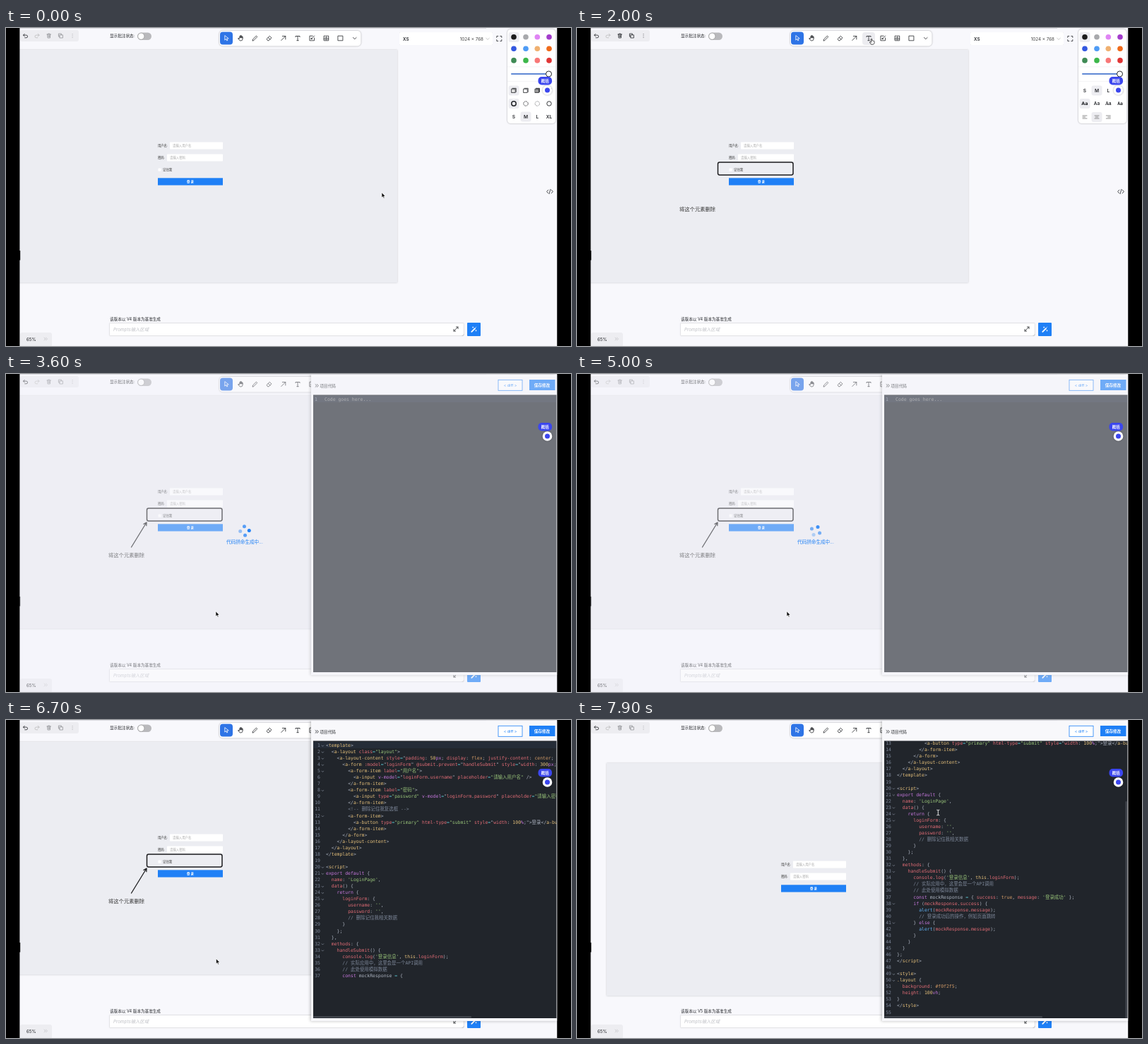
Animation of 800x450 px, one loop 8000 ms. Source, as an HTML page:

```html
<!DOCTYPE html>
<html lang="zh-CN">
<head>
<meta charset="utf-8">
<style>
html, body { margin: 0; width: 100%; height: 100%; overflow: hidden; background: #000; }
svg { display: block; width: 100vw; height: 100vh; }
text { font-family: Inter, "Noto Sans CJK SC", "Noto Sans CJK", sans-serif; white-space: pre; }
.code text { font: 6.46px "DejaVu Sans Mono", "Noto Sans CJK SC", "Noto Sans CJK", monospace; }
.icon { fill: none; stroke-width: .8; stroke-linecap: round; stroke-linejoin: round; }
.card { filter: drop-shadow(0 .7px 1.2px #0005); }
</style>
</head>
<body>
<svg id="stage" viewBox="0 0 800 450"></svg>
<script>
const stage = document.getElementById('stage');
const $ = id => document.getElementById(id);
const INK = '#25272b', BLUE = '#1f80f6', SOFT = '#ededf1';

const rect = (x, y, w, h, fill, more = '') =>
  `<rect x="${x}" y="${y}" width="${w}" height="${h}" fill="${fill}" ${more}/>`;
const dot = (x, y, r, fill, more = '') => `<circle cx="${x}" cy="${y}" r="${r}" fill="${fill}" ${more}/>`;
const label = (x, y, size, s, fill = INK, more = '') =>
  `<text x="${x}" y="${y + size * .36}" font-size="${size}" fill="${fill}" ${more}>${s}</text>`;
const icon = (d, x, y, color = INK, more = '') =>
  `<path class="icon" d="${d}" transform="translate(${x} ${y})" stroke="${color}" ${more}/>`;
const MID = 'text-anchor="middle"', BOLD = 'font-weight="600"';

const CHEVRON = 'M-2.3-1L0 1.2L2.3-1';
const TOOLS = [
  'M-2.2-3.5V2.6L-.5 1L.8 3.5L1.8 3L.7.6L2.8.4Z',
  'M-3.2.4l.9-.8l1 1v-3.6q.5-.8 1 0v2.5v-3.2q.6-.7 1.1 0v3.2v-2.6q.6-.6 1.1 0v3v-1.9q.6-.6 1.1 0v2.6q-.2 3-3 3q-1.7 0-3.2-3.2z',
  'M-3.3 3.3l.5-2L2-3.4L3.4-2L-1.4 2.8z',
  'M-3.3.8L.7-3.2L3.3-.6L-.5 3.3h-1.2zM-1.4-1.1L1.2 1.5',
  'M-3 3L3-3M-1.5-3H3V1.5',
  'M-3-1.8V-3H3V-1.8M0-3V3.2M-1.2 3.2H1.2',
  'M1-3.3H-3.3V3.3H3.3V-.5M-1 1L3.4-3.4M-1 1V-.4M-1 1H.4',
  'M-1.2-3.3H-3.3V3.3H3.3V-3.3H1.2M0-3.5V.6M-1.5-.9L0 .6L1.5-.9M-3.3.8h1.6l.6 1h2.2l.6-1H3.3',
  'M-3.3-3.3H3.3V3.3H-3.3Z', CHEVRON];
const toolX = i => 312 + i * 20.2;

// ---------- page ----------
function form() {
  const field = (y, name, x, hint) => label(215, y, 4.3, name, '#333') +
    rect(x, y - 5, 307 - x, 10, '#fff', 'rx=".7"') + label(x + 4, y, 4.4, hint, '#aaa');
  return `<g id="form">${field(166.5, '用户名:', 232, '请输入用户名')}${field(183.5, '密码:', 228, '请输入密码')}
    <g id="remember">${rect(215.5, 198.5, 4, 4, '#fff', 'rx=".5"')}${label(222, 200.5, 4.4, '记住我', '#333')}</g>
    <g id="login">${rect(215, 212.3, 92, 10.2, BLUE)}${label(261, 217.3, 4.4, '登 录', '#fff', MID + BOLD)}</g></g>`;
}

function marks() {
  return `<g id="marks" fill="none" stroke="#1d1d1f" stroke-width="1.5" stroke-linecap="round" stroke-linejoin="round">
    <rect id="box" x="199.5" y="190" rx="2.4"/><path id="arrow" stroke-width="1.3"/>
    <text id="note" x="145" y="258.5" font-size="7.3" fill="#333" stroke="none"></text></g>`;
}

function topBar() {
  const undo = 'M-3-.9H1.2A1.8 1.8 0 0 1 1.2 2.8H-.8M-1.2-2.7L-3-.9L-1.2.9';
  const edit = ['M-2.8-2H2.8M-2-2L-1.7 3H1.7L2-2M-1-2V-3H1V-2M-.6-.5V1.6M.6-.5V1.6',
    'M-1.2-1.2H3V3H-1.2ZM-1.2 1H-3V-3H1V-1.2', 'M0-2.3v.01M0 0v.01M0 2.3v.01'];
  return rect(20, 3, 83, 16, SOFT, 'rx="3"') + icon(undo, 27.5, 11) +
    `<g transform="matrix(-1 0 0 1 44 11)">${icon(undo, 0, 0, '#bbb')}</g>` +
    `<g id="edit">${edit.map((d, i) => icon(d, 60.7 + i * 16.7, 11)).join('')}</g>` +
    label(147, 11.3, 5.6, '显示批注状态:') +
    rect(186, 6.5, 20, 10.4, '#b9b9bc', 'rx="5.2"') + dot(191.3, 11.7, 4.6, '#fff', 'stroke="#888" stroke-width=".6"') +
    `<g class="card">${rect(302, 4, 200.5, 21.5, '#fff', 'rx="5"')}</g>` +
    rect(404, 6, 18, 18, '#ececf0', 'rx="4" id="hover"') +
    rect(303, 5.5, 18, 18, '#2e74e6', 'rx="4" id="active"') +
    TOOLS.map((d, i) => icon(d, toolX(i), 14.5, INK, `id="tool${i}"`)).join('') +
    `<g class="card" style="filter:drop-shadow(0 .4px .5px #0003)">${rect(557, 6, 132, 18, '#fff', 'rx="1.5"')}</g>` +
    label(562, 15.3, 6.3, 'XS', INK, BOLD) + label(676, 15.3, 6.3, '1024 × 768', '#444', 'text-anchor="end"') +
    icon(CHEVRON, 682, 15.3, '#bbb') +
    icon('M-3.5-1.5V-3.5H-1.5M1.5-3.5H3.5V-1.5M3.5 1.5V3.5H1.5M-1.5 3.5H-3.5V1.5', 698.3, 15);
}

function stylePanel() {
  const X = [719, 736, 752.3, 769];
  const colors = ['#1d1d1d', '#a8a9ac', '#e085f4', '#a33ccb', '#3458e0', '#4f9cf5', '#f0b070', '#f06a1a',
    '#3f8a55', '#3cb74a', '#f87777', '#e03535'];
  const hot = (x, y) => rect(x - 7.5, y - 7, 15, 14, SOFT, 'rx="3"');
  const sizes = y => hot(X[1], y) + ['S', 'M', 'L', 'XL'].map((s, i) => label(X[i], y, 6.6, s, INK, MID + BOLD)).join('');
  const cube = 'M-3-2.2H2.2V3H-3ZM-2-3.2H3.2V2';
  const fonts = ['"DejaVu Sans"', 'Inter', '"Noto Serif"', '"DejaVu Sans Mono"'];
  const aligns = [[-3, 3, 0], [-3, 3, -1.8], [-3, 3, 0]];
  return `<g class="card">${rect(710, 2, 68, 133, '#fff', 'rx="4.5"')}</g>` + hot(X[0], 13) +
    colors.map((c, i) => dot(X[i % 4], 12.7 + (i >> 2) * 16.6, 3.8, c)).join('') +
    rect(710, 54.7, 68, .5, '#e8e8ec') + rect(710, 75, 68, .5, '#e8e8ec') +
    rect(715, 64.2, 53, 1.6, '#2c63c8', 'rx=".8"') + dot(768.5, 65, 4, '#fff', `stroke="${INK}"`) +
    `<g id="shapeStyles">${hot(X[0], 88.5)}${hot(X[0], 107)}
      ${X.map((x, i) => icon(cube, x, 88.5, INK, i == 2 ? 'style="fill:#999"' : i == 0 ? 'style="fill:#ddd"' : '')).join('')}
      ${X.map((x, i) => dot(x, 107, 3.2, 'none', `stroke="${INK}" stroke-width="${[1.5, .9, .6, .9][i]}" ${i == 1 ? 'stroke-dasharray="1.6 .9"' : i == 2 ? 'stroke-dasharray=".7 .6"' : ''}`)).join('')}
      ${sizes(125.5)}</g>` +
    `<g id="textStyles">${sizes(88.5)}${hot(X[0], 107)}${hot(X[1], 126)}
      ${X.map((x, i) => label(x, 107, 6.4, 'Aa', INK, MID + BOLD + ` style='font-family:${fonts[i]},sans-serif'`)).join('')}
      ${aligns.map(([a, b], i) => icon(`M${a}-2H${b}M${[-3, -1.8, -.6][i]} 0h3.6M${a} 2H${b}`, X[i], 126, '#777')).join('')}</g>` +
    icon('M-2.2-2.4L-4.4 0L-2.2 2.4M2.2-2.4L4.4 0L2.2 2.4M.9-3.2L-.9 3.2', 770, 231.5);
}

function promptBar() {
  return label(147, 411.5, 5.6, '该版本以 V4 版本为基准生成', INK, 'id="version"') +
    rect(146.4, 417.4, 502, 18.2, '#fff', 'stroke="#d4d5da" stroke-width=".7" rx="1"') +
    label(152, 426.3, 6.3, 'Prompts输入区域', '#bfc0c6', 'font-style="italic"') +
    icon('M-3 3L3-3M.4-3H3V-.4M-3 .4V3H-.4', 637, 426) +
    icon('M-1 1L1-1M0 1L1 0', 647, 434.5, '#999', 'style="stroke-width:.4"') +
    rect(653, 417, 19, 19, BLUE, 'rx="1"') +
    icon('M-3.2 3.4L1.6-1.4', 662.5, 426.5, '#fff', 'style="stroke-width:1.8"') +
    icon('M-1.3-3.6v1.4M-2-2.9h1.4M3 1v1.4M2.3 1.7h1.4M3.2-3.4L2.6-2.8', 662.5, 426.5, '#fff', 'style="stroke-width:.7"') +
    rect(20, 431, 45, 20, SOFT, 'rx="3"') + label(29, 440.3, 6.2, '65%') +
    icon('M-2-1.8L0 0L-2 1.8M.5-1.8L2.5 0L.5 1.8', 56, 440, '#c4c4c8');
}

function drawer() {
  return `<g id="drawer"><g style="filter:drop-shadow(-1px 0 2px #0004)">${rect(432, 1, 348.5, 425, '#f8f8fb')}</g>
    ${icon('M-2-1.9L0 0L-2 1.9M.4-1.9L2.4 0L.4 1.9', 440, 16.5)}${label(444.5, 16.7, 5.6, '项目代码')}
    ${rect(697, 8.3, 34, 15, '#fff', `stroke="${BLUE}" stroke-width=".8"`)}${label(714, 15.8, 5.4, '&lt; diff &gt;', BLUE, MID)}
    ${rect(741, 8, 36.5, 15, BLUE)}${label(759, 15.6, 5.6, '保存修改', '#fff', MID + BOLD)}
    ${rect(435, 29.5, 344.5, 392.5, '#21252b')}
    <g class="code" clip-path="url(#editor)">
      <g id="scrollY">${rect(435, 31, 344.5, 9, '#69f', 'opacity=".06"')}<g id="gutter"></g></g>
      <text id="hint" x="451" y="37.9" fill="#888">Code goes here...</text>
      <g clip-path="url(#textArea)"><g id="lines"></g></g>
    </g>
    ${rect(435, 419, 224, 2.6, '#41454c', 'id="barX" rx="1.3"')}${rect(776.5, 30, 2.3, 307, '#41454c', 'id="barY" rx="1.1"')}</g>`;
}

stage.innerHTML = `<defs><clipPath id="editor">${rect(435, 29.5, 344.5, 392.5, '#000')}</clipPath>
  <clipPath id="textArea">${rect(451, 30, 340, 392, '#000', 'id="textClip"')}</clipPath></defs>
  ${rect(19, 0, 761.5, 450, '#f8f8fc')}
  <g id="doc"><g style="filter:drop-shadow(0 .5px 1px #0003)">${rect(-32, 31, 586, 329.3, '#ecedf2')}</g>${form()}</g>
  ${marks()}${topBar()}${stylePanel()}${promptBar()}${rect(19, 315, 1.2, 13.5, '#000')}${drawer()}
  ${rect(19, 4, 761.5, 446, '#eef0f6', 'opacity=".385" id="veil"')}
  <g id="spin">${[0, 1, 2, 3].map(i => dot(0, 0, 2.5, BLUE, `id="dot${i}"`)).join('')}${label(338, 237.5, 6.6, '代码拼命生成中...', BLUE, MID)}</g>
  <g class="card">${dot(766.5, 88, 6.8, '#fff')}</g>${dot(766.5, 88, 3.5, '#3b46ee')}
  ${rect(753.5, 69, 19.5, 11.4, '#3b46ee', 'rx="5"')}${label(763.2, 74.6, 5.5, '概括', '#fff', MID + BOLD)}
  ${rect(19, 0, 661, .8, '#d8d8de')}${rect(0, 0, 19.4, 450, '#000')}${rect(780.5, 0, 20, 450, '#000')}
  <path id="pointer" stroke-linejoin="round" stroke-linecap="round"/>`;

// ---------- code ----------
const code = `<template>
  <a-layout class="layout">
    <a-layout-content style="padding: 50px; display: flex; justify-content: center; align-items: center;">
      <a-form :model="loginForm" @submit.prevent="handleSubmit" style="width: 300px;">
        <a-form-item label="用户名">
          <a-input v-model="loginForm.username" placeholder="请输入用户名" />
        </a-form-item>
        <a-form-item label="密码">
          <a-input type="password" v-model="loginForm.password" placeholder="请输入密码" />
        </a-form-item>
        <!-- 删除记住我复选框 -->
        <a-form-item>
          <a-button type="primary" html-type="submit" style="width: 100%;">登录</a-button>
        </a-form-item>
      </a-form>
    </a-layout-content>
  </a-layout>
</template>

<script>
export default {
  name: 'LoginPage',
  data() {
    return {
      loginForm: {
        username: '',
        password: '',
        // 删除记住我相关数据
      }
    };
  },
  methods: {
    handleSubmit() {
      console.log('登录信息', this.loginForm);
      // 实际应用中，这里会是一个API调用
      // 此处使用模拟数据
      const mockResponse = { success: true, message: '登录成功' };
      if (mockResponse.success) {
        alert(mockResponse.message);
        // 登录成功后的操作，例如页面跳转
      } else {
        alert(mockResponse.message);
      }
    }
  }
};
<\/script>

<style>
.layout {
  background: #f0f2f5;
  height: 100vh;
}
</style>
`;
const rows = code.split('\n');
const ROW = 9.056, CHAR = 3.89;

// One capture group per colour, in the order of HUES; the last group is any other text.
const HUES = ['#7d8799', '#98c379', '#e5c07b', '#c678dd', '#d19a66', '#61afef', '#56b6c2', '#abb2bf', '#e06c75', '#abb2bf'];
const SYNTAX = new RegExp([
  '<!--.*?-->|//.*',
  `'[^']*'|(?<=(?:label|class|type|placeholder)=)"[^"]*"`,
  '(?<=</?)[a-z][\\w-]*|\\bthis\\b|\\.layout|\\d+(?=px|%|vh)',
  '\\b(?:export|default|return|const|if|else)\\b|v-model|(?<=\\d)(?:px|vh|%)',
  '\\b(?:true|flex|center)\\b|#f0f2f5',
  'alert', '=', 'mockResponse(?= =)', '[@:]?[a-z][\\w-]*', '[^]'
].map(s => `(${s})`).join('|'), 'g');

const add = (tag, parent, attrs) => {
  const node = document.createElementNS('http://www.w3.org/2000/svg', tag);
  for (const k in attrs) node.setAttribute(k, attrs[k]);
  return parent.appendChild(node);
};
const indent = s => s.search(/\S/);
const tokens = [], gutter = [];
let offset = 0;
rows.forEach((row, i) => {
  const y = 37.9 + i * ROW;
  const line = add('text', $('lines'), { x: 0, y });
  for (const m of row.matchAll(SYNTAX)) {
    const fill = HUES[m.slice(1).findIndex(g => g !== undefined)];
    tokens.push({ node: add('tspan', line, { fill }), text: m[0], at: offset + m.index });
  }
  offset += row.length + 1;
  const g = add('g', $('gutter'), {});
  add('text', g, { x: -8, y, fill: '#7d8799', 'text-anchor': 'end' }).textContent = i + 1;
  if (/^<(script|style)>/.test(row) || indent(rows[i + 1] || '') > indent(row) && row)
    g.insertAdjacentHTML('beforeend', icon('M-1.3-.6L0 .7L1.3-.6', -4.6, y - 1.3, '#8a93a3', 'style="stroke-width:.7"'));
  gutter.push(g);
});

// ---------- motion ----------
const clamp = (v, a = 0, b = 1) => Math.min(b, Math.max(a, v));
const span = (t, a, b) => clamp((t - a) / (b - a));
const ease = u => u * u * (3 - 2 * u);
const show = (id, on) => $(id).setAttribute('visibility', on ? 'visible' : 'hidden');
const move = (id, x, y) => $(id).setAttribute('transform', `translate(${x} ${y})`);

const PATH = [[0, 532, 233], [250, 474, 14], [400, 199.5, 190], [750, 306, 208], [1000, 413, 14], [1200, 145, 256],
  [1750, 150, 262], [2000, 417, 15], [2150, 393, 14], [2350, 178, 245], [2600, 199, 210], [2950, 662, 426],
  [3100, 662, 426], [3500, 297, 336], [5300, 297, 336], [5500, 297.5, 338], [7300, 297.5, 338], [7800, 511.3, 131], [8000, 511.3, 131]];
const STREAM = [[5050, 0], [5600, 382], [6700, 1058], [7165, code.length]];

function along(list, t, shape) {
  const i = clamp(list.findIndex(k => k[0] > t), 0, list.length) || list.length - 1;
  const a = list[i - 1], b = list[i], u = shape(span(t, a[0], b[0]));
  return a.slice(1).map((v, k) => v + (b[k + 1] - v) * u);
}

const POINTERS = {
  arrow: ['M0 0V7L1.7 5.5L2.8 8L4 7.5L2.9 5.1H5Z', '#111', '#fff', .6],
  hand: ['M-.7.6Q0-.4.7.6V3Q2 2.4 2.5 3.4Q4 3 4 4.4V5.6Q3.8 7.8 2.6 8.2H-.6L-2.7 5Q-2.5 3.8-.7 5Z', '#fff', '#111', .7],
  cross: ['M-4 0H4M0-4V4', 'none', '#222', .8],
  beam: ['M-1.6-3.8Q0-3.8 0-3Q0-3.8 1.6-3.8M0-3V3M-1.6 3.8Q0 3.8 0 3Q0 3.8 1.6 3.8', 'none', '#e8e8e8', 1]
};

function drawPointer(t, tool) {
  const [x, y] = along(PATH, t, ease);
  const kind = x > 435 && t > 7300 ? 'beam' : y < 25 && x < 502 || t >= 2950 && t <= 3100 ? 'hand' : tool ? 'cross' : 'arrow';
  const [d, fill, stroke, w] = POINTERS[kind];
  const p = $('pointer');
  Object.entries({ d, fill, stroke, 'stroke-width': w }).forEach(([k, v]) => p.setAttribute(k, v));
  move('pointer', x, y);
}

function drawCode(n) {
  const done = code.slice(0, n).split('\n'), line = done.length, col = done[line - 1].length;
  const left = line < 10 ? 449 : 453;
  const sx = line == 3 ? Math.max(0, left + col * CHAR - 772) : line > 3 && line < 10 ? 25 : 0;
  const sy = Math.max(0, line - 42.7) * ROW;
  for (const k of tokens) k.node.textContent = k.text.slice(0, Math.max(0, n - k.at));
  gutter.forEach((g, i) => {
    g.style.display = i < line ? '' : 'none';
    if (g.children[1]) g.children[1].style.display = i < line - 1 ? '' : 'none';
  });
  move('gutter', left, 0);
  move('scrollY', 0, -sy);
  move('lines', left - sx, -sy);
  $('textClip').setAttribute('x', left - 2);
  $('barX').setAttribute('x', 435 + sx * .72);
  $('barY').setAttribute('y', 30 + 85 * clamp(sy / 111.4));
  show('hint', n < 1);
  show('barX', line > 2);
  show('barY', sy > 0);
}

function draw(t) {
  const tool = t >= 250 && t < 800 ? 8 : t >= 1000 && t < 1800 ? 5 : t >= 2150 && t < 2650 ? 4 : 0;
  $('active').setAttribute('x', toolX(tool) - 9);
  TOOLS.forEach((_, i) => $('tool' + i).setAttribute('stroke', i == tool ? '#fff' : INK));
  show('hover', t >= 1950 && t < 2100);
  $('edit').setAttribute('opacity', t >= 800 && t < 2800 ? 1 : .45);
  const texting = t >= 1000 && t < 2150;
  show('textStyles', texting);
  show('shapeStyles', !texting);

  const next = t >= 7300;
  show('marks', !next);
  const drag = ease(span(t, 400, 750));
  $('box').setAttribute('width', 106.5 * drag);
  $('box').setAttribute('height', 18 * drag);
  $('box').style.display = drag ? '' : 'none';
  $('note').textContent = '将这个元素删除'.slice(0, Math.floor(7 * span(t, 1200, 1750)));
  const pull = ease(span(t, 2350, 2600)), ax = 177.5 + 21.5 * pull, ay = 245 - 35 * pull;
  $('arrow').setAttribute('d', pull ? `M177.5 245L${ax} ${ay}M${ax - 4} ${ay + 2.4}L${ax} ${ay}L${ax - .2} ${ay + 4.6}` : '');

  move('doc', next ? 74 : 0, next ? 30 : 0);
  move('form', 0, next ? 8 : 0);
  move('login', 0, next ? -17 : 0);
  $('remember').style.display = next ? 'none' : '';
  $('version').textContent = `该版本以 V${next ? 5 : 4} 版本为基准生成`;

  const slide = 1 - (1 - span(t, 3050, 3300)) ** 3;
  move('drawer', 350 * (1 - slide), 0);
  $('drawer').style.display = slide ? '' : 'none';
  const busy = t >= 3050 && t < 5050;
  show('veil', busy);
  show('spin', busy);
  for (let i = 0; i < 4; i++) {
    const a = (-95 + i * 90 + (t - 3600) * 393 / 1400) * Math.PI / 180;
    const phase = (((.7 - .2 * i + (t - 3600) / 2000) % 1) + 1) % 1;
    move('dot' + i, 338 + 6.3 * Math.cos(a), 222 + 6.3 * Math.sin(a));
    $('dot' + i).setAttribute('opacity', .3 + .7 * (1 - Math.abs(2 * phase - 1)));
  }
  drawCode(t < 5050 ? 0 : t >= 7165 ? code.length : Math.round(along(STREAM, t, u => u)[0]));
  drawPointer(t, tool);
}

const start = performance.now();
let last = -1;
function tick() {
  const t = Math.floor((performance.now() - start) % 8000 / 100) * 100;
  if (t !== last) draw(last = t);
  requestAnimationFrame(tick);
}
tick();
</script>
</body>
</html>
```
